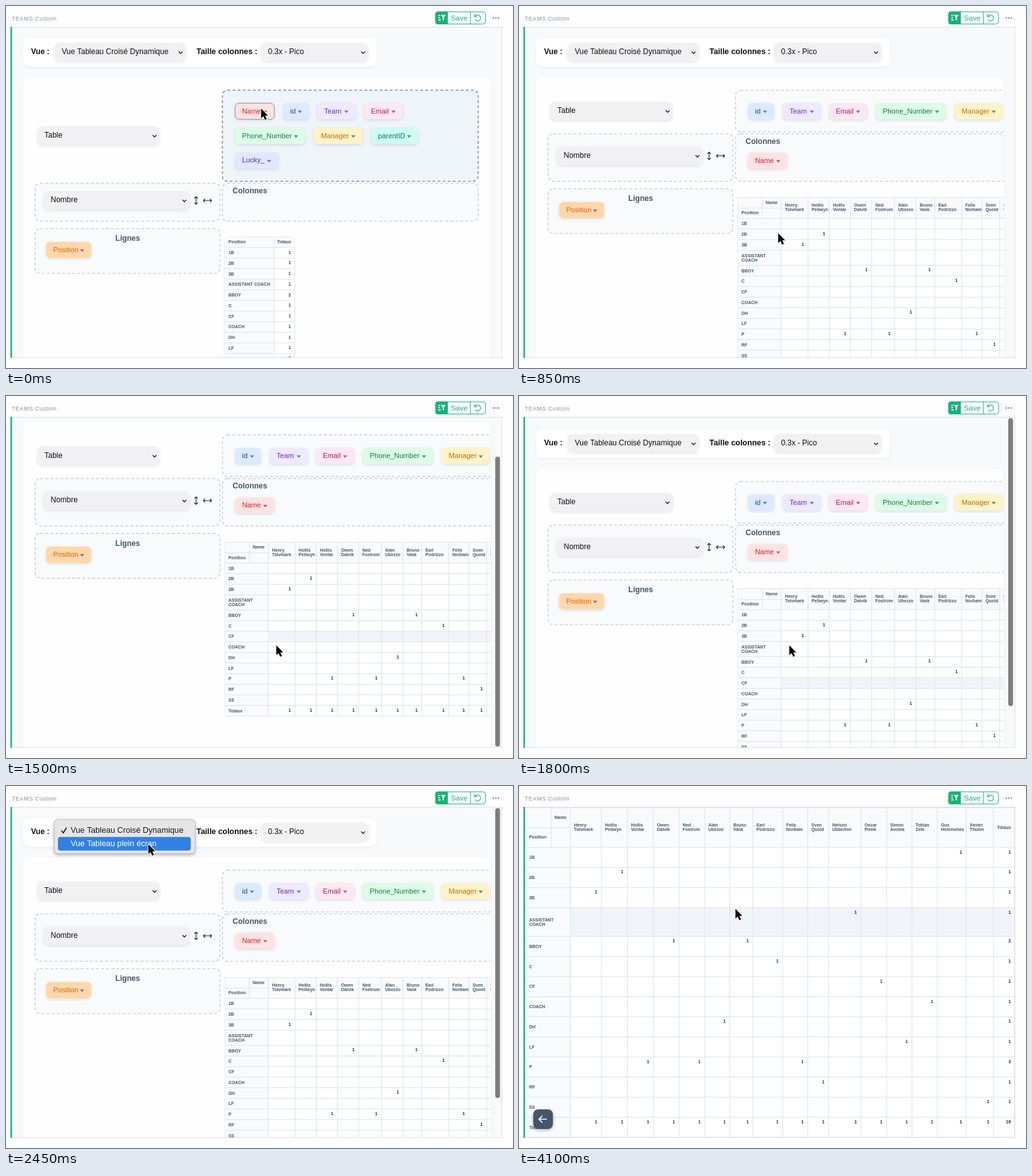
An HTML page with a canvas for the animation above (4.89 s loop, 800 by 572 pixels).

```html
<!DOCTYPE html>
<html lang="fr">
<head>
<meta charset="utf-8">
<title>Pivot table</title>
<style>
html, body { margin: 0; width: 100%; height: 100%; overflow: hidden; background: #fefefe; }
canvas { display: block; }
</style>
</head>
<body>
<canvas id="stage" width="800" height="572"></canvas>
<script>
const LOOP = 4890, STEP = 50;
const DRAG = 100, DROP = 650, OPEN = 2250, CLOSE = 2750, FULL = 2850;
const GREEN = '#16b378', SLATE = '#475569', LINE = '#e2e8f0', PALE = '#f8fafc', HOVER = '#f0f4f8';
const ctx = document.getElementById('stage').getContext('2d');

const people = ['Henry Tolvmark', 'Hollis Pebwyn', 'Hollis Vontar', 'Owen Dalvik', 'Ned Fostrum',
  'Alan Ubezzo', 'Bruno Vask', 'Earl Podrizzo', 'Felix Norbam', 'Sven Quold', 'Nelson Ubberton',
  'Oscar Plenk', 'Simon Avolea', 'Tobias Zelk', 'Gus Hemmelies', 'Xavier Thulen'];
const roles = ['1B', '2B', '3B', 'ASSISTANT COACH', 'BBOY', 'C', 'CF', 'COACH', 'DH', 'LF', 'P', 'RF', 'SS', 'Totaux'];
const roleOf = [2, 1, 10, 4, 10, 8, 4, 5, 10, 11, 3, 6, 9, 7, 0, 12];
const total = role => role === 13 ? people.length : roleOf.filter(r => r === role).length;

const chipColors = {
  Name: ['#fee2e2', '#d6202b'], id: ['#dbeafe', '#1e40af'], Team: ['#ede9fe', '#6d28d9'],
  Email: ['#fce7f3', '#be185d'], Phone_Number: ['#dcfce7', '#15803d'], Manager: ['#fef3c7', '#cc6a0a'],
  parentID: ['#ccfbf1', '#0f766e'], Lucky_: ['#e0e7ff', '#3f37c9'], Position: ['#fed7aa', '#e0650c']
};
const smallCols = [345, 414, 456, 489.5, 523, 556.5, 592.5, 626.5, 656, 698.5, 730.5, 758.5, 800];
const fullCols = [10, 81, 130, 171, 212, 252.5, 293, 332.5, 369, 416, 455.5, 488.5, 539.5, 580, 620, 660, 705.5, 748.5, 782];

// Keys are [time, ...values]
const mouseKeys = [[0, 402, 162], [80, 402, 162], [450, 391, 322], [650, 391, 324], [1050, 426, 394],
  [1850, 426, 394], [2200, 190, 70], [2280, 190, 70], [2440, 224, 92], [2780, 224, 92],
  [3230, 381, 378], [3720, 381, 378], [3970, 341, 194]];
const scrollKeys = [[1150, 0], [1200, 1], [1450, 70], [1520, 72], [1740, 0], [1800, -2], [1950, 0]];

function track(keys, t) {
  const next = keys.findIndex(k => k[0] > t);
  if (next < 1) return (next ? keys[keys.length - 1] : keys[0]).slice(1);
  const a = keys[next - 1], b = keys[next];
  const u = (t - a[0]) / (b[0] - a[0]), s = u * u * (3 - 2 * u);
  return a.slice(1).map((v, i) => v + (b[i + 1] - v) * s);
}

function text(str, x, y, size, color, weight = '', align = 'left') {
  ctx.font = `${weight} ${size}px "Liberation Sans", Arial, sans-serif`;
  ctx.fillStyle = color;
  ctx.textAlign = align;
  ctx.textBaseline = 'middle';
  ctx.fillText(str, x, y + .5);
}
const small = (str, x, y, align, color = SLATE) => text(str, x, y, 6.9, color, 'bold', align);

function rect(x, y, w, h, color) {
  ctx.fillStyle = color;
  ctx.fillRect(x, y, w, h);
}

function box(x, y, w, h, r, fill, { stroke, width = 1, dash = [], shadow = 0 } = {}) {
  ctx.save();
  ctx.beginPath();
  ctx.roundRect(x, y, w, h, r);
  if (shadow) {
    ctx.shadowColor = `rgba(0,0,0,${shadow})`;
    ctx.shadowBlur = 5;
    ctx.shadowOffsetY = 1.5;
  }
  ctx.fillStyle = fill;
  ctx.fill();
  ctx.shadowColor = 'transparent';
  if (stroke) {
    ctx.setLineDash(dash);
    ctx.lineWidth = width;
    ctx.strokeStyle = stroke;
    ctx.stroke();
  }
  ctx.restore();
}

function stroke(d, color, width = 1.2) {
  ctx.strokeStyle = color;
  ctx.lineWidth = width;
  ctx.stroke(new Path2D(d));
}

function fillPath(d, color) {
  ctx.fillStyle = color;
  ctx.fill(new Path2D(d));
}

function clip(x, y, w, h, draw) {
  ctx.save();
  ctx.beginPath();
  ctx.rect(x, y, w, h);
  ctx.clip();
  draw();
  ctx.restore();
}

function chip(label, x, right, y, border) {
  const [bg, ink] = chipColors[label];
  box(x, y - 12.7, right - x - .7, 25.4, 6, bg, { shadow: .12, stroke: border });
  text(label, x + 11, y - .3, 11.2, ink);
  fillPath(`M${right - 18.3} ${y - 1}h6.8l-3.4 4z`, '#737d8c');
}

function select(label, x, right, y) {
  box(x, y - 14.5, right - x - .5, 29, 8, '#f1f1f3', { shadow: .1 });
  text(label, x + 11, y - .7, 12, '#111');
  stroke(`M${right - 11.5} ${y - 1}l3 3l3 -3`, '#222', 1.4);
}

function zone(x, y, right, h, activeFill) {
  box(x, y, right - x, h, 8, activeFill || PALE,
    { stroke: activeFill ? '#8093a8' : '#c9d3df', width: 1.6, dash: [4.5, 3.5] });
}

function countTable(x, y) {
  const split = x + 78, right = x + 110.5, rowH = 16.75;
  box(x, y, 110.5, 260, [6, 6, 0, 0], '#fff', { stroke: LINE, shadow: .05 });
  box(x, y, 110.5, rowH, [6, 6, 0, 0], PALE);
  rect(x, y + rowH, 78, 240, PALE);
  small('Position', x + 6, y + 8.3);
  small('Totaux', split + 5, y + 8.3);
  rect(split, y, 1, 260, LINE);
  roles.forEach((role, i) => {
    const top = y + rowH * (i + 1);
    rect(x, top - .5, 110.5, 1.2, LINE);
    small(role, x + 6, top + 8.3);
    small(total(i), right - 6, top + 7.7, 'right', '#334155');
  });
}

function pivotTable(cols, top, headH, rowH, tallH, cornerX, hovered) {
  const left = cols[0], right = cols[cols.length - 1], first = cols[1];
  const rowTop = i => top + headH + i * rowH + (i > 3 ? tallH - rowH : 0);
  const bottom = rowTop(14);
  rect(left, top, right - left, bottom - top, '#fff');
  rect(left, top, right - left, headH, PALE);
  rect(left, top, first - left, bottom - top, PALE);
  if (hovered >= 0) rect(first, rowTop(hovered), right - first, rowTop(hovered + 1) - rowTop(hovered), HOVER);

  rect(left, top, right - left, 1, LINE);
  for (let i = 0; i <= 14; i++) rect(left, rowTop(i) - .6, right - left, 1.3, LINE);
  cols.forEach((x, i) => rect(x - .6, top, 1.3, bottom - top, i ? LINE : '#edf1f5'));
  rect(cornerX, top, 1.2, headH, LINE);
  rect(left, top + headH / 2, first - left, 1.2, LINE);
  small('Name', (cornerX + first) / 2, top + headH / 4, 'center');
  small('Position', left + 6, top + headH * .745);

  const middle = top + headH / 2;
  people.forEach((person, i) => {
    const x = cols[i + 1], end = cols[i + 2];
    if (!end) return;
    person.split(' ').forEach((part, line) => small(part, x + 5.7, middle - 4 + line * 7.3));
    small(1, end - 6.3, rowTop(roleOf[i]) + 7.3, 'right', '#1e293b');
    small(1, end - 6.3, rowTop(13) + 7.3, 'right', '#1e293b');
  });
  roles.forEach((role, i) => {
    const y = (rowTop(i) + rowTop(i + 1)) / 2;
    const lines = role.split(' ');
    lines.forEach((part, n) => small(part, left + 6, y + (n - (lines.length - 1) / 2) * 7));
  });
  if (cols.length > 18) {
    small('Totaux', (cols[17] + right) / 2, middle, 'center');
    roles.forEach((_, i) => small(total(i), right - 6, rowTop(i) + 7.3, 'right', '#1e293b'));
  }
  return y => roles.findIndex((_, i) => y >= rowTop(i) && y < rowTop(i + 1));
}

function header() {
  ctx.letterSpacing = '0.5px';
  text('TEAMS Custom', 9, 19.7, 9.1, '#8f9096');
  ctx.letterSpacing = '0px';
  box(678, 9.2, 78.7, 19.2, 4, '#fff', { stroke: GREEN });
  box(677.5, 8.7, 19.7, 20.2, [4, 0, 0, 4], GREEN);
  stroke('M682 15h3M682 18.5h3M682 22h4', '#fff', 1.3);
  fillPath('M686 14h8l-3 4v5l-2 -1v-4z', '#fff');
  text('Save', 702, 19, 11.6, GREEN);
  rect(732.3, 9, 1, 19.5, GREEN);
  stroke('M740 16.5a4.7 4.7 0 1 1 0 5M739.5 13v4h4', GREEN, 1.1);
  [769, 773, 777].forEach(x => box(x - 1.2, 17.8, 2.4, 2.4, 1.2, '#85868d'));
}

function editor(t, mouse) {
  const dropped = t >= DROP, dragging = t >= DRAG && !dropped;
  const over = dragging && mouse[1] > 278;
  const topEnd = dropped ? 199 : 277, right = dropped ? 900 : 745;
  const mid = topEnd + 3, midH = dropped ? 75 : over ? 71 : 60, low = mid + midH + 11.7;
  const center = mid + midH / 2 - 2.7;

  box(27, 50.5, 558, 45.5, 10, '#fff', { shadow: .05 });
  text('Vue :', 39.5, 72.5, 12.1, '#111', 'bold');
  select('Vue Tableau Croisé Dynamique', 77, 284, 73);
  text('Taille colonnes :', 300.5, 72.5, 12.4, '#111', 'bold');
  select('0.3x - Pico', 402.5, 572, 73);
  box(26.5, 113, 738.5, 520, 12, '#fefefe', { shadow: .04 });

  clip(26, 113, 739, 520, () => {
    select('Table', 49.5, 243, (133 + topEnd) / 2);
    zone(341.5, 133, right, topEnd - 133, (t < DRAG || dragging && !over) && '#eff4f8');
    zone(46, mid, 337.5, midH);
    zone(341.5, mid, right, midH, over && '#f5f8fb');
    zone(46, low, 337.5, 70.8);
    select('Nombre', 59.5, 290, center);
    stroke(`M300 ${center - 6}v12m-2.7 -2.7l2.7 2.7l2.7 -2.7m-5.4 -6.6l2.7 -2.7l2.7 2.7`, '#222', 1.1);
    stroke(`M311.5 ${center}h13m-2.7 -2.7l2.7 2.7l-2.7 2.7m-7.6 0l-2.7 -2.7l2.7 -2.7`, '#222', 1.1);
    text('Colonnes', 357.5, mid + 12, 12, SLATE, 'bold');
    text('Lignes', 192, low + 15.6, 12.1, SLATE, 'bold', 'center');
    chip('Position', 63.5, 135, low + 33.7);

    if (dropped) {
      chip('id', 361.5, 403, 166.3);
      chip('Team', 416, 477, 166.3);
      chip('Email', 489, 550, 166.3);
      chip('Phone_Number', 563, 674.5, 166.3);
      chip('Manager', 687.5, 764, 166.3);
      chip('Name', 361.5, 424, 244.5);
      const hovered = t < 1100 || t >= 1900 ? -1 : t < 1400 ? 3 : 6;
      pivotTable(smallCols, 302, 33.5, 16.75, 24, 383.5, hovered);
    } else {
      if (!dragging) chip('Name', 361.5, 424, 166.3, '#8d929c');
      chip('id', 437.5, 478.5, 166.3);
      chip('Team', 491, 552, 166.3);
      chip('Email', 565, 626.3, 166.3);
      chip('Phone_Number', 361.5, 472.5, 205.3);
      chip('Manager', 486, 563, 205.3);
      chip('parentID', 576, 651, 205.3);
      chip('Lucky_', 361.5, 430, 244.2);
      countTable(345, low + 13);
      if (over) box(359, mid + 27, 50.5, 22.5, 6, '#e2e8f0', { stroke: '#333b47', width: 1.5, dash: [4, 3] });
      if (dragging) chip('Name', mouse[0] + 310, mouse[0] + 373, mouse[1] + 88);
    }
  });
}

function scrollbar(t, scroll) {
  const dragBar = t >= 150 && t < DROP;
  const alpha = dragBar ? 1 : t < 1250 ? 0 : Math.max(0, Math.min(1, (2700 - t) / 150));
  ctx.globalAlpha = alpha;
  const length = dragBar ? 419 : 458 + Math.min(0, scroll) * 1.5;
  box(772, 35 + Math.max(0, scroll) * .85, 7.5, length, 3.7, '#7d7d7d');
  ctx.globalAlpha = 1;
}

function dropdown(mouse) {
  box(76, 53, 222.5, 54, 6, '#e5e5e6', { stroke: '#bdbdbf', shadow: .35 });
  const active = mouse[1] >= 80 ? 1 : 0;
  box(82, active ? 80.5 : 59, 209.5, 21.5, 4, '#3181e4');
  const ink = i => i === active ? '#fff' : '#1c1c1c';
  stroke('M87.5 70.5l3 3.5l5 -8', ink(0), 1.7);
  text('Vue Tableau Croisé Dynamique', 102, 70, 12.7, ink(0));
  text('Vue Tableau plein écran', 102, 91.3, 12.7, ink(1));
}

function fullScreen(t) {
  const y = track(mouseKeys, t > 3200 ? t : t - 130)[1];
  const rowAt = pivotTable(fullCols, 34, 63, 31.75, 45.3, 50, -1);
  const row = rowAt(y);
  if (row >= 0) pivotTable(fullCols, 34, 63, 31.75, 45.3, 50, row);
  box(22.5, 511, 31, 31, 8, SLATE, { shadow: .3 });
  stroke('M44 526.5h-12m5 -5.5l-5.5 5.5l5.5 5.5', '#fff', 1.6);
}

function pointer([x, y], hand) {
  ctx.save();
  ctx.translate(x, y);
  ctx.lineJoin = 'round';
  if (hand) {
    ctx.translate(-1.5, -1);
    const d = 'M1 0C-1 0 -1 2 -.5 3L2 10L0 9C-3 8 -4 10 -2 11L5 17H11C13 13 12 9 11 7C10 5 8 5 8 7C8 5 5.5 4.5 5.5 6.5L3 1Q2 0 1 0Z';
    fillPath(d, '#fff');
    stroke(d, '#111', 1.2);
    stroke('M5.5 11l1 3.5M7.8 10.5l.8 3.5', '#111', .9);
  } else {
    const d = 'M.5 0V15.5L4.1 12.2L6.7 18L9.5 16.8L6.9 11.2H11.5Z';
    stroke(d, '#fff', 2);
    fillPath(d, '#000');
  }
  ctx.restore();
}

function draw(t) {
  const mouse = track(mouseKeys, t), [scroll] = track(scrollKeys, t);
  rect(0, 0, 800, 572, '#fefefe');
  header();
  rect(8, 33, 775, 522.5, t < FULL ? '#f8f9fb' : '#fff');
  clip(8, 33, 774, 522, () => {
    if (t >= FULL) return fullScreen(t);
    ctx.translate(0, -scroll);
    editor(t, mouse);
    ctx.translate(0, scroll);
    scrollbar(t, scroll);
  });
  rect(8, 33, 775, 1, '#dcdfe3');
  rect(8, 555, 775, 1, '#dcdfe3');
  rect(782, 33, 1, 523, '#dcdfe3');
  rect(7, 33, 2.4, 523, GREEN);
  if (t >= OPEN && t < CLOSE) dropdown(mouse);
  pointer(mouse, t >= DRAG && t < DROP);
}

const start = performance.now();
function tick() {
  const t = (performance.now() - start) % LOOP;
  draw(Math.floor(t / STEP) * STEP);
  requestAnimationFrame(tick);
}
tick();
</script>
</body>
</html>
```
